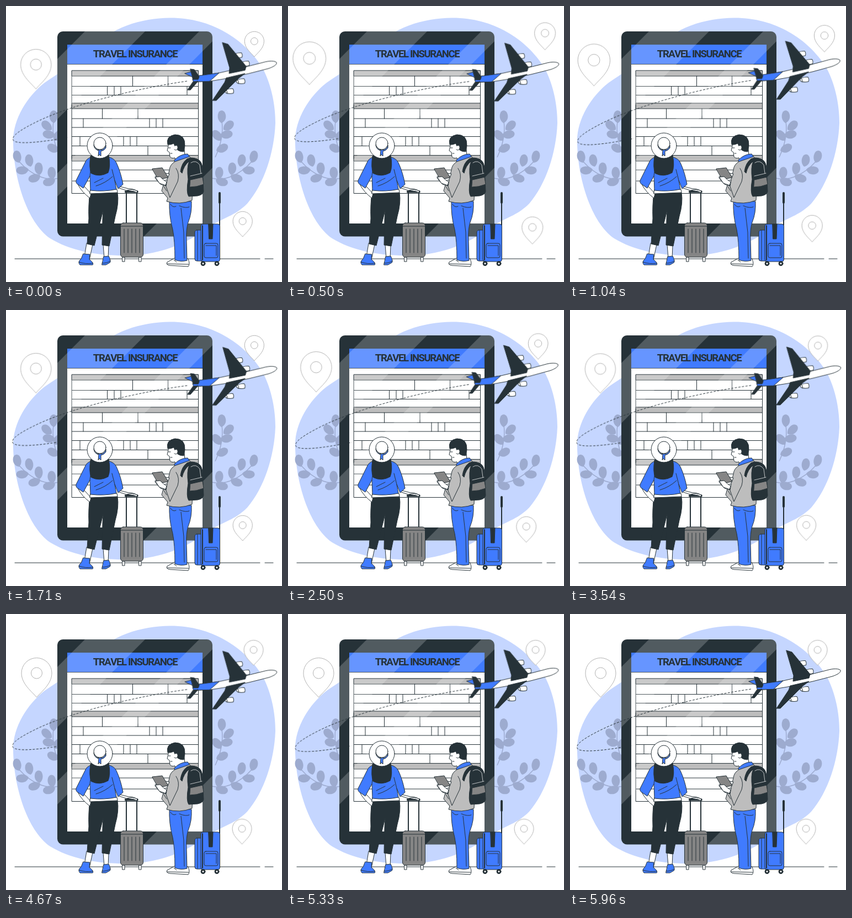
Write an HTML page without scripts that moves like this. It is 500 px wide and 500 px high and loops after 6000 ms.

```html
<!DOCTYPE html>
<html lang="en">
<head>
<meta charset="utf-8">
<title>Travel insurance</title>
<style>
html, body { margin: 0; width: 100%; height: 100%; overflow: hidden; background: #fff; }
svg { display: block; width: 100vw; height: 100vh; }
.ink { fill: #263238; }
.blue { fill: #407bff; }
.white { fill: #fff; }
.grey { fill: #bdbdbd; }
.mid { fill: #858585; }
.line { fill: none; }
.art { stroke: #263238; stroke-width: 1; stroke-linecap: round; stroke-linejoin: round; }
.title { font: 700 18.5px Roboto, "Open Sans", sans-serif; font-kerning: none; letter-spacing: -1.4px; text-anchor: middle; }
.pin { fill: #fff; stroke: #b2b2b2; }
.pin * { vector-effect: non-scaling-stroke; }
.pins { transform-origin: 250px 250px; animation: beat 6s linear -40ms infinite; }
.flight { transform-origin: 251px 157px; animation: wind 1.5s linear -40ms infinite; }
@keyframes beat {
  0%, 30.5%, 40%, 60%, 100% { transform: scale(1); }
  10.5%, 50% { transform: scale(1.1); }
}
@keyframes wind {
  0%, 100% { transform: rotate(0deg); }
  25% { transform: rotate(1deg); }
  75% { transform: rotate(-1deg); }
}
</style>
</head>
<body>
<svg viewBox="0 0 500 500">
<defs>
  <g id="pin" class="pin">
    <path d="M0 44C-8 34-27.500 20-27.500 0A27.500 27.500 0 0 1 27.500 0C27.500 20 8 34 0 44Z"/>
    <circle r="10"/>
  </g>
  <path id="leaf" d="M0 0C-8-3-10-11-7-18C-4-24 2-24 5-19C8-12 6-4 0 0Z"/>
  <g id="low" fill="#9dabcf" stroke="none">
    <path d="M96 312C70 318 44 304 24 282" fill="none" stroke="#9dabcf" stroke-width="1.500"/>
    <use href="#leaf" transform="translate(24 284) rotate(-14)"/>
    <use href="#leaf" transform="translate(45 291) rotate(-10)"/>
    <use href="#leaf" transform="translate(41 296) rotate(-94)"/>
    <use href="#leaf" transform="translate(61 306) rotate(-4)"/>
    <use href="#leaf" transform="translate(62 307) rotate(-110)"/>
    <use href="#leaf" transform="translate(85 314) rotate(-6)"/>
    <use href="#leaf" transform="translate(89 315) rotate(-104)"/>
  </g>
  <g id="high" fill="#9dabcf">
    <path d="M98 274C88 252 83 232 86 208" fill="none" stroke="#9dabcf" stroke-width="1.500"/>
    <use href="#leaf" transform="translate(87 212)"/>
    <use href="#leaf" transform="translate(83 224) rotate(-48)"/>
    <use href="#leaf" transform="translate(89 234) rotate(-80)"/>
    <use href="#leaf" transform="translate(96 262) rotate(-64)"/>
    <use href="#leaf" transform="translate(88 244) rotate(40)"/>
  </g>
  <path id="engine" class="white" d="M-7-3C-3-5 4-5 7-4Q9 0 7 4C3 5-3 4-6 2Q-9 0-7-3ZM-5-3Q-3 0-5 3"/>
  <clipPath id="device"><rect x="93" y="46" width="281" height="371.500" rx="10"/></clipPath>
</defs>

<path fill="#c5d6ff" d="M297 21.500C371 21 431 59 464 111C483 146 488 185 488 212C486 265 468 322 437 358C418 377 400 382 374 396C335 426 285 451 220 452C165 453 116 443 80 421C38 392 13 310 13 244C13 205 38 164 70 139C104 115 126 106 148 82C190 38 245 22 297 21.500Z"/>
<use href="#low"/>
<use href="#high"/>
<use href="#low" transform="translate(469 0) scale(-1 1)"/>
<use href="#high" transform="translate(477 0) scale(-1 1)"/>

<g class="pins">
  <use href="#pin" x="55.500" y="107"/>
  <use href="#pin" transform="translate(448.500 65) scale(.636)"/>
  <use href="#pin" transform="translate(427.500 389) scale(.636)"/>
</g>

<path class="art line" d="M16 458H460M469 458H484"/>

<!-- tablet with form -->
<g clip-path="url(#device)">
  <path class="ink" d="M93 46H374V418H93Z"/>
  <path class="white" d="M111 70H356V394H111Z"/>
  <path class="blue" d="M111 70H356V105H111Z"/>
  <path class="art line" d="M111 105.500H356"/>
  <g class="art">
    <path class="white" d="M119.500 117H348.500V339.500H119.500Z"/>
    <path class="grey" d="M119.500 117h229v10h-229ZM119.500 176h229v10h-229ZM119.500 270.500h229v10.500h-229Z"/>
    <path class="line" d="M119.500 145.500h229m-229 16h229m-229 42.500h229m-229 16h229m-229 16.500h229m-229 17h229m-229 43.500h229m-229 20h229M229.500 127v18.500M293.500 127v18.500M183.500 145.500v16m12.500-16v16m12-16v16m120-16v16M174.500 186v18m64.500-18v18M140 204v16m120-16v16m12-16v16m12-16v16M134 236.500v17m79-17v17m12-17v17m12-17v17M257 253.500v17"/>
  </g>
  <path fill="#fff" opacity=".2" d="M143 46H252L93 205V96ZM350 46H374V64L93 345V303ZM249 418L374 293V418Z"/>
</g>
<text class="title ink" x="234" y="92.500">TRAVEL INSURANCE</text>

<!-- plane and trail -->
<g class="flight art">
  <path class="line" stroke-dasharray="4 2.500" stroke-linecap="butt" d="M328 136C250 147 130 175 60 208C25 225 10 236 13 243C17 252 60 248 114 238"/>
  <path class="blue" d="M324 122L335 119L350 127L346 132Z"/>
  <path class="white" d="M340 137C336 132 338 128 350 126L386 121L430 111L465 102C478 98 488 99 490 102C491 106 484 110 475 113L440 122L400 131L370 136Z"/>
  <path class="blue" d="M340 137C336 132 338 128 350 126L386 121L369 136Z"/>
  <path class="ink" d="M334 114L341 115L350 128L348 133L339 133ZM339 137L348 136L334 152L329 152Z"/>
  <use href="#engine" transform="translate(420 89.500) rotate(-8)"/>
  <use href="#engine" transform="translate(433 104.500) rotate(-8)"/>
  <use href="#engine" transform="translate(425 136.500) rotate(-8)"/>
  <use href="#engine" transform="translate(404.500 154.500) rotate(-8)"/>
  <path class="ink" d="M392 66L402 69L435 109L433 116L404 122L405 112ZM399 130L433 122L421 131L381 171L374 171L396 138Z"/>
</g>

<!-- woman -->
<g class="art">
  <path class="white" d="M146 430L141 460H151L157 432ZM176 432L178 458H185L186 434Z"/>
  <path class="blue" d="M140 449L152 450L151 459Q160 466 157 469H134Q129 464 136 458ZM177 454L186 453Q191 463 188 465L181 469H174Z"/>
  <path class="line" d="M132 464Q144 468 157 466M174 466Q183 466 189 462"/>
  <path class="ink" d="M152 338H202Q205 357 198 381L187 435L174 433L175 385L176 370L160 434L147 431L150 385Q149 360 152 338Z"/>
  <path class="white" d="M130 323Q138 338 152 348L154 340L143 328ZM206 327L222 331Q232 331 239 336Q233 338 224 336L205 330Z"/>
  <path class="white" d="M153 333L201 332L202 338L152 340Z"/>
  <path class="blue" d="M154 274Q146 276 143 284L127 316Q126 321 130 323L140 330L152 308L153 334Q178 337 200 332L197 316L203 331L212 323Q208 301 200 284Q196 276 187 274Z"/>
  <path class="line" d="M154 292L152 308M192 296L197 316M163 326Q180 321 193 309M160 320L176 312"/>
  <path class="ink" d="M153 272Q150 292 154 303Q169 311 185 302Q190 290 186 270Z"/>
  <circle class="white" cx="170" cy="253" r="23"/>
  <path class="blue" d="M159 252Q161 261 170 261Q179 261 181 252L181 257Q178 262 172 263L172 272L169 269L167 272L168 262Q160 260 159 252Z"/>
  <circle class="white" cx="170" cy="249" r="11"/>
</g>

<!-- grey suitcase -->
<g class="art">
  <path class="line" stroke-width="2" d="M218 393V337H237V393"/>
  <path class="ink" d="M216 335H239V338H216Z"/>
  <path class="white" d="M211 455h4v8h-4ZM241 455h4v8h-4Z"/>
  <rect class="mid" x="207.500" y="393" width="41" height="62" rx="5"/>
  <path class="line" d="M208 399H248M214 404V447m7-43v43m7-43v43m7-43v43m7-43v43"/>
  <path class="white" d="M219 334Q229 331 238 335L237 338L232 336Z"/>
</g>

<!-- man -->
<g class="art">
  <path class="white" d="M307 456L292 464Q289 469 297 470L330 472Q334 468 330 458Z"/>
  <path class="line" d="M292 467L331 468M304 460L309 464"/>
  <path class="blue" d="M296 353L336 354Q337 375 330 392Q326 404 327 425L328 461Q317 464 306 460Q306 425 302 405Q295 380 296 353Z"/>
  <path class="line" d="M314 362Q326 367 332 364M317 366L322 410L323 457M298 359Q302 366 308 363"/>
  <path class="white" d="M295 249L292 262L296 265L297 273Q300 277 306 275L307 281L324 270L322 248Z"/>
  <path class="ink" d="M293 251Q289 236 306 233Q325 233 324 253L322 264Q315 264 311 261L310 254L306 254L304 249Q298 252 293 251Z"/>
  <path class="white" d="M306 253Q312 251 311 258Q309 263 305 260"/>
  <path class="line" d="M294 257H298M298 267H301"/>
  <path class="blue" d="M305 279Q316 268 329 268L334 275L308 288Z"/>
  <path class="grey" d="M306 282Q297 287 296 297L291 318L285 324L282 335L293 348L291 354Q315 361 337 352L341 285L333 273Z"/>
  <path class="white" d="M271 313Q268 309 273 308L283 317L292 315L290 326L280 323ZM288 303L296 304L294 309L286 305Z"/>
  <path class="mid" d="M265 295L283 293L294 311L276 314Z"/>
  <path class="white" d="M271 310L279 309Q286 316 291 319L289 325L278 321Z"/>
  <path class="line" d="M289 324L297 347L311 318Q315 304 308 294M286 327L291 335"/>
  <path class="ink" d="M328 277Q335 273 346 277Q356 281 356 296L358 336Q357 342 347 344L331 345Q326 338 330 314Q327 292 332 281Q322 289 319 303L316 300Q318 284 328 277Z"/>
  <path class="mid" d="M334 315L356 310L358 323Q346 328 333 328Z"/>
  <path class="line" stroke="#fff" stroke-width=".7" d="M335 284Q344 278 351 288L353 303M334 308L355 303"/>
</g>

<!-- blue suitcase -->
<g class="art">
  <path class="line" stroke-width="2" d="M387 356V397"/>
  <path class="line" stroke-width="4" d="M387 339V356"/>
  <rect class="blue" x="342" y="406" width="20" height="56" rx="4"/>
  <path class="line" d="M347 407V461"/>
  <rect class="blue" x="353" y="395" width="34.500" height="68" rx="4"/>
  <path class="ink" d="M367 395h8l-1 27h-6Z"/>
  <path class="line" stroke-width="2" d="M356 398V460"/>
  <rect class="blue" x="359" y="430" width="25" height="26" rx="3"/>
  <path class="line" d="M362 434H381V452"/>
  <g class="ink"><circle cx="357" cy="466.500" r="4"/><circle cx="382" cy="466.500" r="4"/></g>
  <g class="white" stroke="none"><circle cx="357" cy="466.500" r="1.500"/><circle cx="382" cy="466.500" r="1.500"/></g>
</g>
</svg>
</body>
</html>
```
